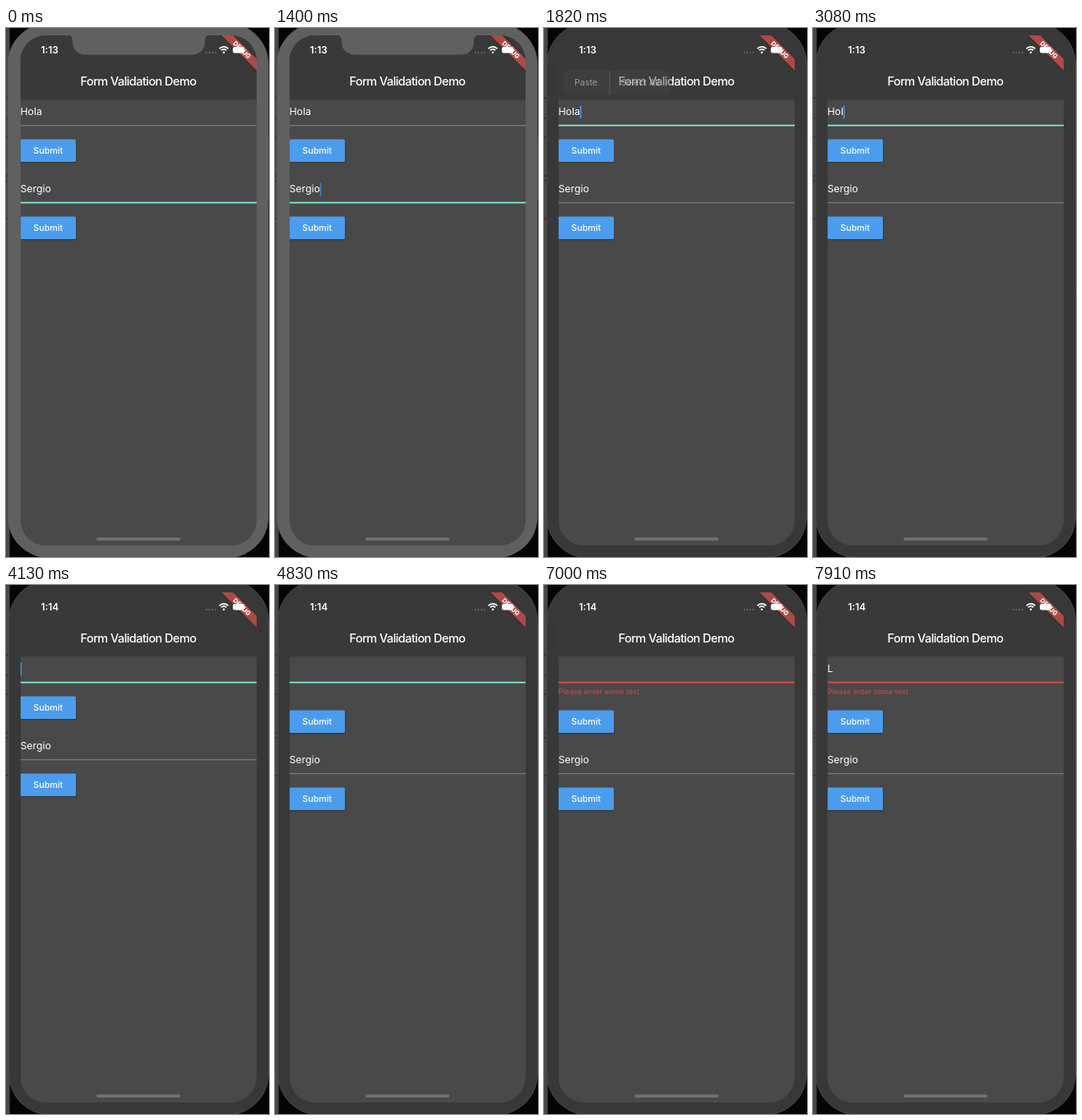
Animation of 320 by 644 pixels, one loop 8000 ms. Source, as an HTML page with a canvas:

```html
<!DOCTYPE html>
<html lang="en">
<head>
<meta charset="utf-8">
<title>Form Validation Demo</title>
<style>
  html, body { margin: 0; width: 100%; height: 100%; overflow: hidden; background: #000; }
  canvas { display: block; width: 320px; height: 644px; }
</style>
</head>
<body>
<canvas id="stage"></canvas>
<script>
const W = 320, H = 644, LOOP = 8000;
const canvas = document.getElementById('stage');
const ctx = canvas.getContext('2d');
const ratio = window.devicePixelRatio || 1;
canvas.width = W * ratio;
canvas.height = H * ratio;

const TAP = 1540, TOOLBAR = 1750, CLOCK = 3780, SUBMIT = 4830;
const EDITS = [[0, 'Hola'], [2730, 'Hol'], [3360, 'Ho'], [3800, 'H'], [4060, ''], [7140, 'L']];
const BLINK_START = -720;
const LEFT = 17.5, RIGHT = 305, TOP = 9, BOTTOM = 630;
const GREY = [134, 134, 134], TEAL = [125, 240, 218], RED = [224, 80, 76];

const clamp = v => Math.max(0, Math.min(1, v));
const easeOut = p => 1 - (1 - p) ** 2;
const progress = (t, start, length) => clamp((t - start) / length);
const lerp = (a, b, p) => a + (b - a) * p;
const mix = (a, b, p) => a.map((v, i) => lerp(v, b[i], p));
const rgb = c => `rgb(${c.map(Math.round).join()})`;

function box(x, y, w, h, color, radius = 0) {
  ctx.fillStyle = color;
  ctx.beginPath();
  ctx.roundRect(x, y, w, h, radius);
  ctx.fill();
}

function text(str, x, y, size, { weight = 400, color = '#fff', align = 'left', spacing = 0 } = {}) {
  ctx.font = `${weight} ${size}px Inter, sans-serif`;
  ctx.letterSpacing = spacing + 'px';
  ctx.textAlign = align;
  ctx.fillStyle = color;
  ctx.fillText(str, x, y);
}

function withAlpha(alpha, draw) {
  ctx.save();
  ctx.globalAlpha = alpha;
  draw();
  ctx.restore();
}

function drawDesktop() {
  box(0, 0, W, H, '#050505');
  box(0, 0, 4.5, H, '#484848');
  for (const y of [85, 110, 133, 180, 186, 232]) box(0, y - 0.5, 4.5, 1, '#202020');
  box(318, 133, 2, 78, '#2b2b2b');
}

function drawBezel(active) {
  const x = active ? 3.5 : 2;
  box(x, -6, 319.5 - x, 651, active ? '#383838' : '#606060', 50);
  if (active) {
    ctx.strokeStyle = '#4e4e4e';
    ctx.lineWidth = 0.8;
    ctx.stroke();
  }
}

function drawNotch(color) {
  ctx.fillStyle = color;
  ctx.beginPath();
  ctx.moveTo(75, TOP - 1);
  ctx.quadraticCurveTo(81, TOP, 81, 16);
  ctx.arcTo(81, 32.5, 98, 32.5, 15);
  ctx.lineTo(226, 32.5);
  ctx.arcTo(242, 32.5, 242, 16, 15);
  ctx.lineTo(242, 16);
  ctx.quadraticCurveTo(242, TOP, 248, TOP - 1);
  ctx.fill();
}

function drawBanner() {
  ctx.save();
  ctx.translate(287, 26.6);
  ctx.rotate(Math.PI / 4);
  ctx.shadowColor = 'rgba(0,0,0,.4)';
  ctx.shadowBlur = 3 * ratio;
  box(-40, -5, 80, 10, '#ae4a45');
  ctx.shadowColor = 'transparent';
  text('DEBUG', 0, 2.7, 7.6, { weight: 800, align: 'center' });
  ctx.restore();
}

function drawStatus(t) {
  text(t < CLOCK ? '1:13' : '1:14', 42.5, 31, 11.8, { weight: 600 });
  for (let i = 0; i < 4; i++) box(243 + i * 3.6, 29, 1.8, 1.8, '#777', 1);
  ctx.strokeStyle = '#fff';
  ctx.lineWidth = 1.7;
  for (const r of [4.4, 7.4]) {
    ctx.beginPath();
    ctx.arc(265, 30.3, r, -Math.PI * 0.76, -Math.PI * 0.24);
    ctx.stroke();
  }
  box(263.7, 28.5, 2.6, 2.6, '#fff', 1.3);
  box(276, 23, 14, 7.5, '#fff', 2.3);
  box(290.5, 25.5, 1.2, 2.6, '#ddd', 0.6);
}

function drawAppBar() {
  const shade = ctx.createLinearGradient(0, 85, 0, 89);
  shade.addColorStop(0, 'rgba(0,0,0,.25)');
  shade.addColorStop(1, 'rgba(0,0,0,0)');
  box(LEFT, 85, RIGHT - LEFT, 4, shade);
  box(LEFT, TOP, RIGHT - LEFT, 76.5, '#393939');
  text('Form Validation Demo', 161, 69.5, 14.6, { weight: 500, align: 'center', spacing: -0.6 });
}

function drawField(value, y, focus, color, cursor) {
  text(value, LEFT, y, 12.25);
  const thickness = lerp(0.9, 1.7, focus);
  box(LEFT, y + 12.5 - thickness / 2, RIGHT - LEFT, thickness, rgb(color));
  if (cursor > 0) {
    const x = LEFT + ctx.measureText(value).width;
    withAlpha(cursor, () => box(x, y - 12, 1.6, 16, '#4a9bee', 0.8));
  }
}

function drawButton(y) {
  ctx.save();
  ctx.shadowColor = 'rgba(0,0,0,.3)';
  ctx.shadowBlur = 2 * ratio;
  ctx.shadowOffsetY = ratio;
  box(LEFT, y, 67.5, 27.5, '#4b9cec', 1.6);
  ctx.restore();
  text('Submit', LEFT + 33.75, y + 17.6, 10.7, { weight: 500, align: 'center' });
}

function drawToolbar(alpha) {
  withAlpha(alpha, () => {
    box(23.5, 52, 131, 29.5, '#444', 6);
    box(79.5, 52, 0.8, 29.5, '#858585');
    text('Paste', 51, 70, 10.7, { align: 'center' });
    text('Select All', 117, 70, 10.7, { align: 'center' });
  });
}

// The caret toggles every half second with a short fade.
function cursorAlpha(t, start, startsSolid) {
  const age = t - start, phase = age % 1000;
  if (startsSolid && age < 500) return 1;
  return phase < 500 ? easeOut(progress(phase, 0, 250)) : 1 - easeOut(progress(phase, 500, 250));
}

function render(t) {
  const active = t >= TAP;
  const [edited, value] = EDITS.filter(([at]) => at <= t).pop();
  const focus = progress(t, TAP, 200);
  const error = progress(t, SUBMIT, 200);
  const shift = t >= SUBMIT ? 17 : 0;
  const cursor = active ? cursorAlpha(t, Math.max(TAP, edited), true) : cursorAlpha(t, BLINK_START, false);

  ctx.setTransform(ratio, 0, 0, ratio, 0, 0);
  drawDesktop();
  drawBezel(active);

  ctx.save();
  ctx.beginPath();
  ctx.roundRect(LEFT, TOP, RIGHT - LEFT, BOTTOM - TOP, 31);
  ctx.clip();
  box(LEFT, TOP, RIGHT - LEFT, BOTTOM - TOP, '#494949');
  drawAppBar();
  drawField(value, 106.2, focus, mix(mix(GREY, TEAL, focus), RED, error), active ? cursor : 0);
  if (error > 0) {
    withAlpha(error, () => text('Please enter some text', LEFT, 133 - 3 * (1 - error), 9.15, { color: '#c94c4a' }));
  }
  drawButton(135.5 + shift);
  drawField('Sergio', 200.2 + shift, 1 - focus, mix(TEAL, GREY, focus), active ? 0 : cursor);
  drawButton(229.5 + shift);
  if (t >= TOOLBAR && t < EDITS[1][0]) drawToolbar(progress(t, TOOLBAR, 150));
  drawBanner();
  drawNotch(active ? '#383838' : '#606060');
  drawStatus(t);
  box(110, 620.3, 102.5, 3.6, '#717171', 1.8);
  ctx.restore();
}

function tick(now) {
  render(now % LOOP);
  requestAnimationFrame(tick);
}
render(0);
requestAnimationFrame(tick);
</script>
</body>
</html>
```
